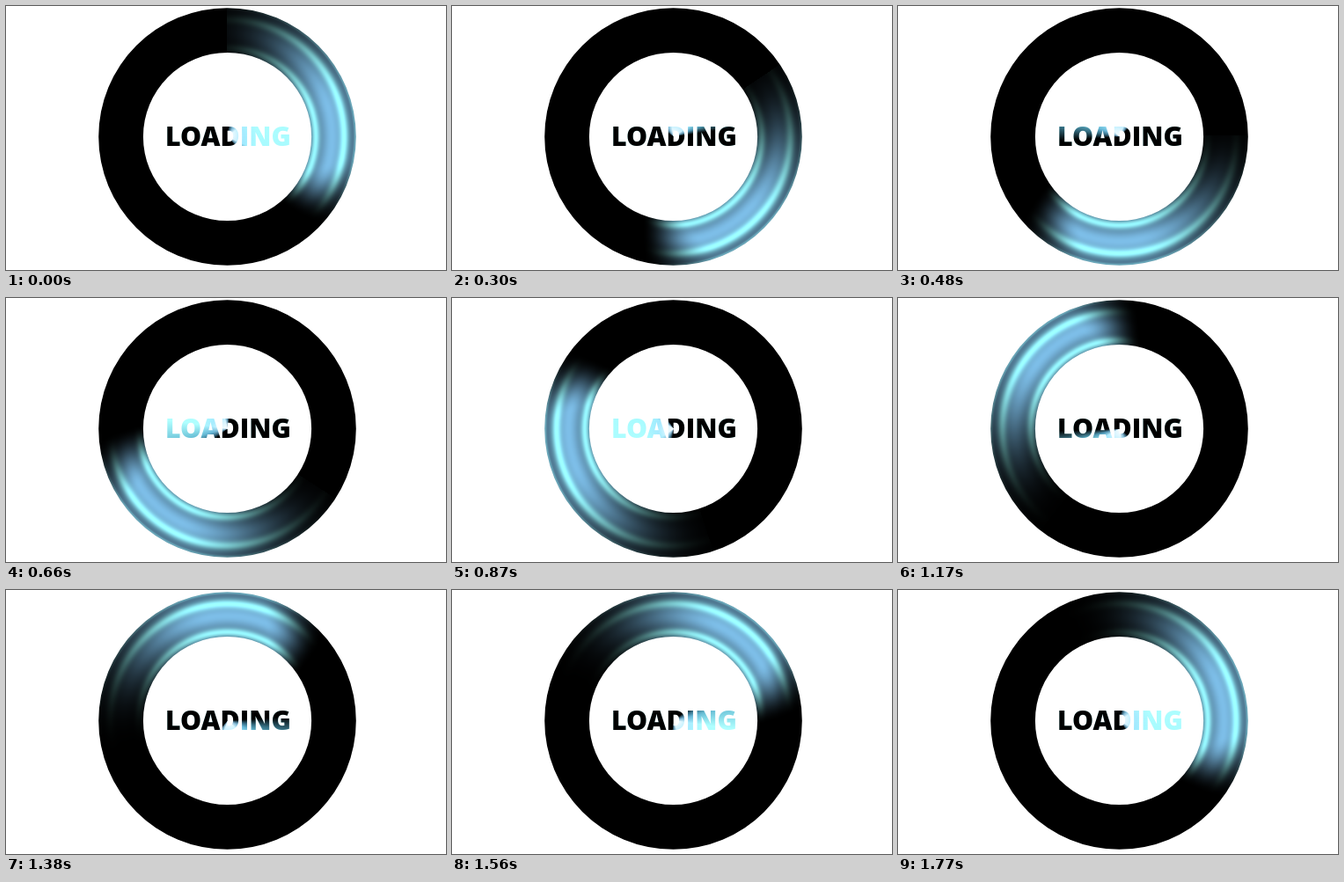
Animation of 500x300 px, one loop 1800 ms. Source, as an HTML page with a canvas:

```html
<!DOCTYPE html>
<html lang="en">
<head>
<meta charset="utf-8">
<title>Loading</title>
<style>
html, body { margin: 0; width: 100%; height: 100%; overflow: hidden; background: #fff; }
canvas { position: absolute; left: 0; top: 0; }
#label {
  position: absolute; left: 152.5px; top: 128px; width: 200px; height: 40px;
  font: 800 30.25px/40px "Open Sans", sans-serif; text-align: center;
  color: transparent; -webkit-background-clip: text; background-clip: text;
}
</style>
</head>
<body>
<canvas id="stage" width="500" height="300"></canvas>
<div id="label">LOADING</div>
<script>
const LOOP = 1800, STEP = 30, W = 500, H = 300;
const CX = 251.5, CY = 148.5, OUTER = 146.3, INNER = 95.6;
const BODY = [125, 190, 232], SHINE = [70, 125, 105];
const ctx = document.getElementById('stage').getContext('2d');
const label = document.getElementById('label');
const image = ctx.createImageData(W, H);

const smooth = (a, b, x) => {
  const k = Math.min(1, Math.max(0, (x - a) / (b - a)));
  return k * k * (3 - 2 * k);
};
const bell = (x, mid, width) => Math.exp(-(((x - mid) / width) ** 2));

// Polar position and tube shading of every ring pixel
const pixels = [];
for (let y = 0; y < H; y++) {
  for (let x = 0; x < W; x++) {
    const dx = x + .5 - CX, dy = y + .5 - CY, r = Math.hypot(dx, dy);
    if (r < INNER - 2 || r > OUTER + 2) continue;
    pixels.push({
      at: (y * W + x) * 4,
      angle: Math.atan2(dy, dx) * 180 / Math.PI + 90,
      across: (r - INNER) / (OUTER - INNER),
      body: .62 + .38 * bell(r, 119, 12),
      shine: bell(r, 100.5, 4.5) + bell(r, 133, 5) + .4 * bell(r, 145.5, 1.5)
    });
  }
}

function drawRing(turn) {
  const trail = turn / 360 * 25;
  for (const p of pixels) {
    // degrees ahead of the dim tail
    const u = (p.angle - turn + 780) % 360 - 60;
    const rise = u < -trail ? 0 : smooth(-25, 75, u);
    const fall = 1 - smooth(112 - 15 * p.across, 141 - 8 * p.across, u);
    const body = p.body * rise ** 1.5 * fall;
    const shine = p.shine * rise ** 1.2 * fall;
    for (let c = 0; c < 3; c++) image.data[p.at + c] = BODY[c] * body + SHINE[c] * shine;
    image.data[p.at + 3] = 255;
  }
  ctx.putImageData(image, 0, 0);
  ctx.globalCompositeOperation = 'destination-in';
  ctx.beginPath();
  ctx.arc(CX, CY, OUTER, 0, Math.PI * 2);
  ctx.arc(CX, CY, INNER, 0, Math.PI * 2, true);
  ctx.fill();
  ctx.globalCompositeOperation = 'source-over';
}

// [degrees, brightness] of the beam that sweeps the lettering backwards
const BEAM = [[0, 0], [13, .3], [26, .6], [48, 1], [113, .95], [128, .45], [140, 0], [360, 0]];
const beamStops = BEAM
  .map(([a, b]) => `rgba(0,${160 * b},${255 * b},${1 - b}) ${a}deg`).join(',');

function drawLabel(turn) {
  label.style.backgroundImage =
    `conic-gradient(from ${2 - turn}deg at 99px 20.5px, ${beamStops}),` +
    'radial-gradient(circle at 99px 20.5px, #fff 0, #e2f8ff 8px, #a9edff 18px, #b0ffff 34px)';
}

let last = -1;
function frame(now) {
  const step = Math.floor(now % LOOP / STEP);
  if (step !== last) {
    const turn = step * STEP / LOOP * 360;
    drawRing(turn);
    drawLabel(turn);
    last = step;
  }
  requestAnimationFrame(frame);
}
frame(0);
</script>
</body>
</html>
```
